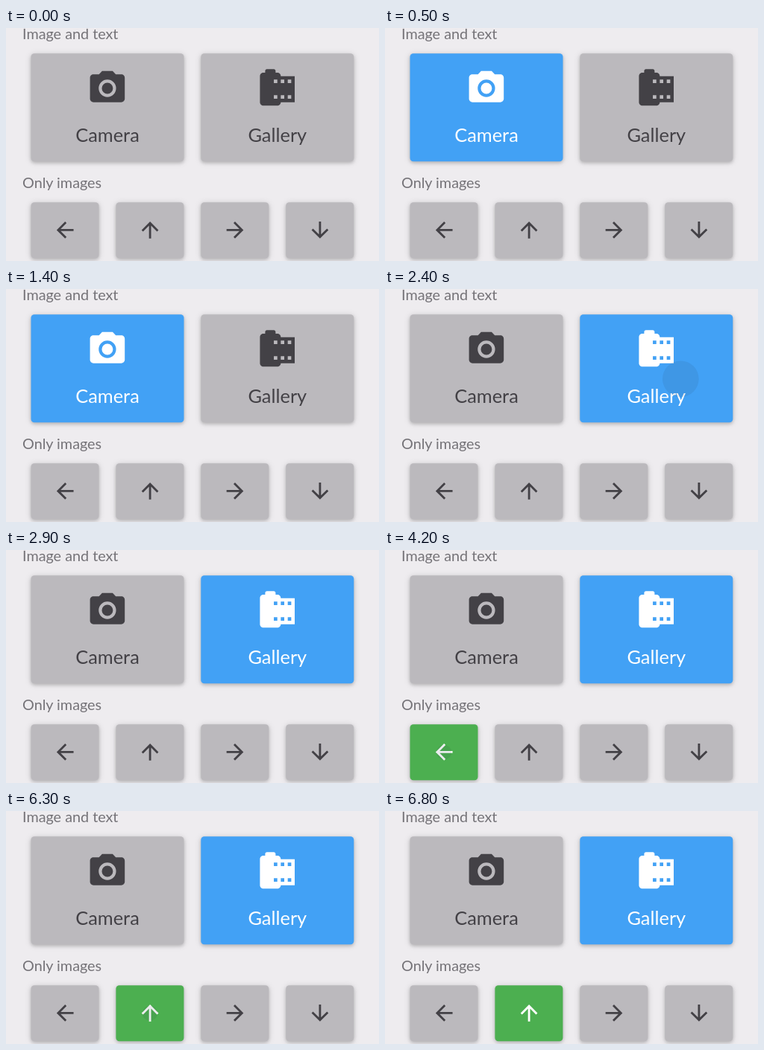
An HTML page for the animation above (8 s loop, 500x313 px).

```html
<!DOCTYPE html>
<html lang="en">
<head>
<meta charset="utf-8">
<style>
  html, body { margin: 0; width: 100%; height: 100%; overflow: hidden; background: #eeecef; }
  #stage { position: relative; width: 500px; height: 313px; overflow: hidden; font-family: Lato, sans-serif; }
  h2 { position: absolute; left: 22px; margin: 0; font: 19.8px/24px Lato, sans-serif; color: #757378; white-space: nowrap; }
  .button {
    position: absolute; left: 0; top: 0; overflow: hidden; border-radius: 4.5px;
    background: #bbb9bd; color: #434146;
    box-shadow: 0 2px 4px rgba(0, 0, 0, .18), 0 1px 10px rgba(0, 0, 0, .13);
  }
  .button svg { display: block; width: 100%; height: 100%; fill: currentColor; }
  .button text { font-size: 25.4px; text-anchor: middle; }
</style>
</head>
<body>
<div id="stage">
  <h2 style="top:-5px">Image and text</h2>
  <h2 style="top:195px">Only images</h2>
</div>
<script>
const LOOP = 8000, RIPPLE = 500;
const BLUE = '#42a1f5', GREEN = '#4caf50';
const CAMERA = 'M9 2 7.17 4H4c-1.1 0-2 .9-2 2v12c0 1.1.9 2 2 2h16c1.1 0 2-.9 2-2V6c0-1.1-.9-2-2-2h-3.17L15 2zm3 15a5 5 0 1 1 0-10 5 5 0 0 1 0 10zm0-1.8a3.2 3.2 0 1 0 0-6.4 3.2 3.2 0 0 0 0 6.4z';
const ROLL = 'M14 5c0-1.1-.9-2-2-2h-1V2c0-.55-.45-1-1-1H6c-.55 0-1 .45-1 1v1H4c-1.1 0-2 .9-2 2v15c0 1.1.9 2 2 2h8c1.1 0 2-.9 2-2h8V5z'
  + [10, 14, 18].map(x => `M${x} 7v2h2v-2zM${x} 16v2h2v-2z`).join('');
const ARROW = 'M20 11H7.83l5.59-5.59L12 4l-8 8 8 8 1.41-1.41L7.83 13H20z';

const stage = document.getElementById('stage');

function addButton({ x, y, w, h, icon, label = '', color, on = Infinity, off = LOOP, touch = [w / 2, h / 2], r0 = 0 }) {
  const el = document.createElement('div');
  el.className = 'button';
  el.style.cssText = `transform:translate(${x}px,${y}px);width:${w}px;height:${h}px`;
  el.innerHTML = `<svg viewBox="0 0 ${w} ${h}">${icon}
    <text x="${w / 2}" y="118.3">${label}</text>
    <circle cx="${touch[0]}" cy="${touch[1]}" fill="#234"/></svg>`;
  stage.append(el);
  const ripple = el.querySelector('circle');

  return time => {
    const active = time >= on && time < off;
    el.style.background = active ? color : '';
    el.style.color = active ? '#fff' : '';
    const p = active ? Math.min((time - on) / RIPPLE, 1) : 1;
    ripple.setAttribute('r', r0 + p * w * .8);
    ripple.setAttribute('opacity', .09 * (1 - p));
  };
}

const icon = (path, cx, cy, scale, turn = 0) =>
  `<path fill-rule="evenodd" d="${path}" transform="translate(${cx} ${cy}) rotate(${turn}) scale(${scale}) translate(-12 -12)"/>`;

const big = { y: 34.3, w: 205, h: 145, color: BLUE };
const buttons = [
  addButton({ ...big, x: 33.5, icon: icon(CAMERA, 102.4, 46.7, 2.33), label: 'Camera', on: 500, off: 2400 }),
  addButton({ ...big, x: 261.3, icon: icon(ROLL, 102.4, 46.7, 2.33), label: 'Gallery', on: 2400, touch: [135, 86.5], r0: 24 }),
  ...[[4200, 6300], [6300], [], []].map(([on, off], i) => addButton({
    x: 33.5 + 113.9 * i, y: 234.2, w: 91, h: 75, color: GREEN, on, off, r0: 10,
    icon: icon(ARROW, 45.7, 37.2, 1.42, 90 * i)
  }))
];

function draw() {
  const time = performance.now() % LOOP;
  buttons.forEach(update => update(time));
  requestAnimationFrame(draw);
}
draw();
</script>
</body>
</html>
```
